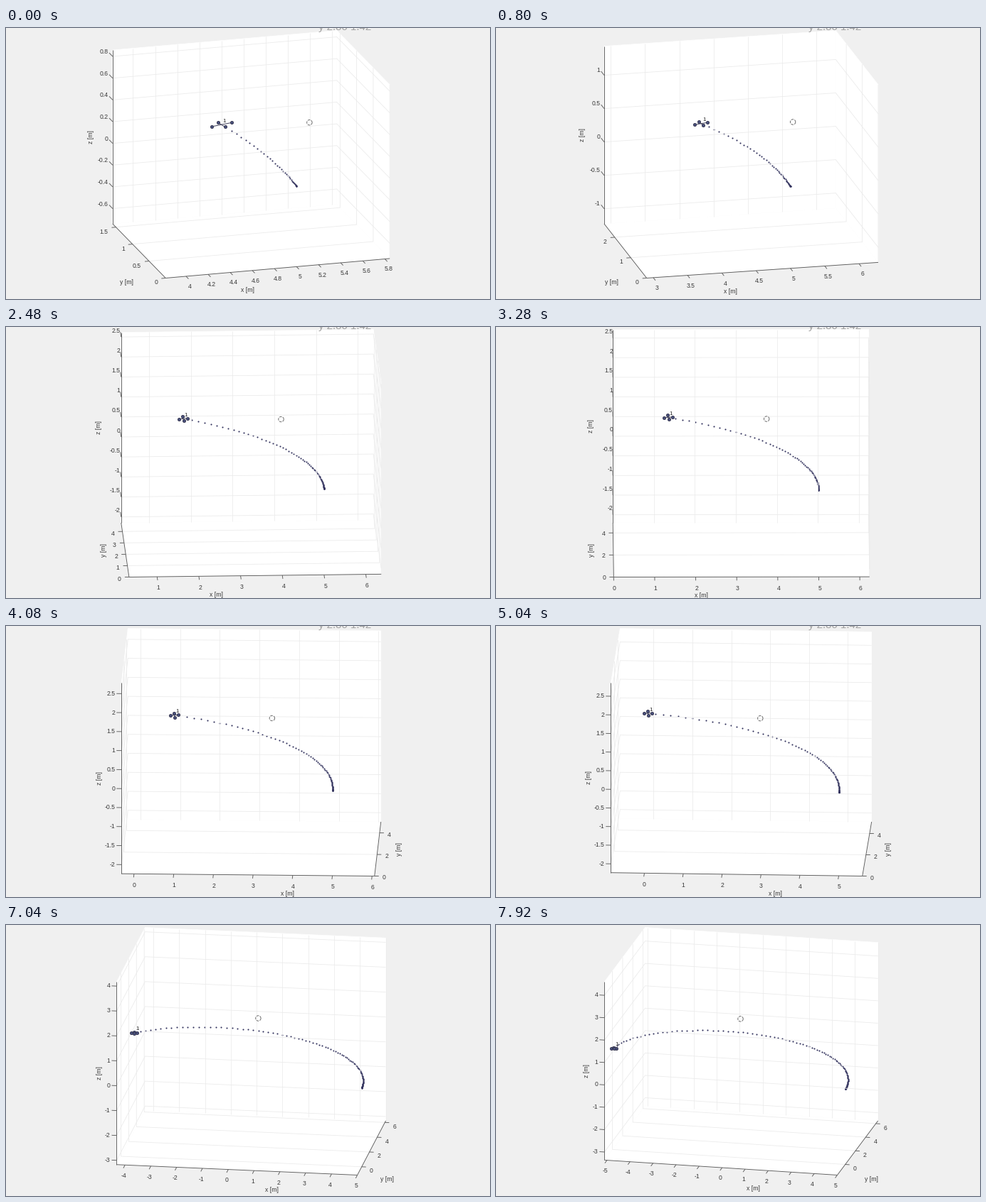
Animation of 680x382 px, one loop 8 s. Source, as a matplotlib script:

```python
import numpy as np
import matplotlib.pyplot as plt
from matplotlib.animation import FuncAnimation
from matplotlib.collections import LineCollection

W, H, FRAMES, INTERVAL = 680, 382, 100, 80
PX = 0.72  # points per pixel at 100 dpi
INK, GRID, NAVY, PAPER = "#3a3a3a", "#ebebeb", "#34345f", "#f0f0f0"

# The camera pan and the flight slow down in the middle of the loop.
KEY_FRAMES = [0, 19, 31, 51, 63, 77, 99]
AZIMUTH = [-13.3, -7.8, -1.8, 1.45, 2.1, 3.55, 9.9]
STEP = [34.9, 56.7, 69.3, 74.8, 80, 89.9, 113]

CENTRE = np.array([344, 177.5])       # middle of the plot box on the stage
BOX_HEIGHT, DEPTH_RISE = 349, 76.5    # whole box, and the part due to depth
TALL = 0.757                          # drawn height per unit of width
ASPECT = np.array([1, 0.788, 0.788])  # y and z ranges relative to x

plt.rcParams["font.family"] = "Liberation Sans"
fig = plt.figure(figsize=(W / 100, H / 100), dpi=100, facecolor=PAPER)
ax = fig.add_axes([0, 0, 1, 1])


def turn_at(step):
    return 0.00025 * np.asarray(step, float) ** 2


def helix(step):
    """Position after a number of steps of constant angular acceleration."""
    angle = turn_at(step)
    return np.stack([5 * np.cos(angle), 5 * np.sin(angle), 0.39 * angle], axis=-1)


def box_edges(azimuth):
    """Screen vectors of the box edges; the box always fills the same height."""
    a = np.radians(azimuth)
    size = (BOX_HEIGHT - DEPTH_RISE) / (TALL + 0.37 * abs(np.sin(a)))
    shift = size * np.sin(a)
    return np.array([[size * np.cos(a), 0.37 * shift],
                     [shift, -DEPTH_RISE],
                     [0, -TALL * size]])


def limits(points):
    """Equal-scale limits around the path, with room for the rotors."""
    lo, hi = points.min(axis=0) - (0.11, 0, 0), points.max(axis=0) + (0, 0.1, 0)
    half = max((hi - lo) / ASPECT) * ASPECT / 2
    return (lo + hi) / 2 - half, (lo + hi) / 2 + half


def ticks(lo, hi, steps, bounds):
    step = steps[int(np.searchsorted(bounds, hi - lo))]
    first, last = np.ceil(lo / step - 1e-3), np.floor(hi / step + 1e-3)
    return np.arange(first, last + 1) * step


def unit(v):
    return v / np.hypot(*v)


def number(value):
    return f"{round(value, 2) + 0:g}"


def label(pos, text, **kw):
    style = dict(ha="center", va="center_baseline", color=INK, fontsize=8.6 * PX)
    ax.text(pos[0], pos[1], text, **{**style, **kw})


def lines(segments, color, width):
    ax.add_collection(LineCollection(segments, colors=color, linewidths=width * PX))


def draw_box(edges, lo, hi, project):
    u, v, w = edges
    (x0, y0, z0), (x1, y1, z1) = lo, hi
    left = v[0] < 0
    lean = abs(v[0])
    axis_x, wall_x = (x0, x1) if left else (x1, x0)
    z_y = y1 if left else y0
    corner = project(x0, y0, z0)

    xs = ticks(x0, x1, (.2, .5, 1), (2.5, 5.2))
    ys = ticks(y0, y1, (.5, 1, 2), (2.5, 4.9))
    zs = ticks(z0, z1, (.2, .5, 1), (2.4, 6.2))

    # floor, back wall and side wall
    for start, p, q in ((corner, u, v), (corner + v, u, w),
                        (project(wall_x, y0, z0), v, w)):
        ax.fill(*np.array([start, start + p, start + p + q, start + q]).T,
                color="white", lw=0.5)
    grid = [[project(x, y1, z0), project(x, y1, z1)] for x in xs]
    grid += [[project(axis_x, y, z0), project(wall_x, y, z0), project(wall_x, y, z1)]
             for y in ys]
    grid += [[project(axis_x, y1, z), project(wall_x, y1, z), project(wall_x, y0, z)]
             for z in zs]
    lines(grid, GRID, 0.8)

    # axes, tick marks and numbers
    x_dir, y_dir = -unit(v), unit(-u if left else u)
    z_dir = unit(v if left else -u)
    marks = [[corner, corner + u],
             [project(axis_x, y0, z0), project(axis_x, y1, z0)],
             [project(x0, z_y, z0), project(x0, z_y, z1)]]
    for x in xs:
        p = project(x, y0, z0)
        marks.append([p, p + 5 * x_dir])
        label(p + 6 * x_dir + (1, 9), number(x))
    for y in ys:
        p = project(axis_x, y, z0)
        marks.append([p, p + 6 * y_dir])
        label(p + 11 * y_dir + (0, 4.5 * min(1, lean / 30)), number(y),
              ha="right" if left else "left")
    for z in zs:
        p = project(x0, z_y, z)
        marks.append([p, p + 7 * z_dir])
        label(p + 9 * z_dir - (0, 1), number(z), ha="right")
    lines(marks, "#5a5a5a", 0.9)

    side = -1 if left else 1
    label(corner + u / 2 + (side * (57 - .2 * lean), 25 + .07 * lean), "x [m]")
    y_mid = project(axis_x, (y0 + y1) / 2, z0)
    if lean > 18:
        label(y_mid + (side * (27 - .13 * lean), 43), "y [m]")
    else:
        label(y_mid + (side * 30, 0), "y [m]", rotation=90, va="center")
    z_mid = project(x0, z_y, (z0 + z1) / 2)
    z_gap = 18 + 3.2 * max(len(number(z)) for z in zs)
    label(z_mid - (z_gap, 0), "z [m]", rotation=90, va="center")


def draw_drone(step, project):
    head = helix(step)
    bank = 0.04 * np.sin(turn_at(step)) ** 2
    arms = np.array([(0.1, 0.03, 0), (0.015, -0.06, -bank)])
    tips = [[project(*(head - arm)), project(*(head + arm))] for arm in arms]
    lines(tips, "#44445c", 1)
    ax.scatter(*np.concatenate(tips).T, s=(4.2 * PX) ** 2, color="#48507c",
               edgecolor="#33334a", lw=0.8 * PX, zorder=3, snap=False)
    label(project(*head) + (4, -6), "1", fontsize=8 * PX, color="#222222")


def draw(frame):
    ax.cla()
    ax.set(xlim=(-.5, W - .5), ylim=(H - .5, -.5))
    ax.axis("off")

    step = np.interp(frame, KEY_FRAMES, STEP)
    edges = box_edges(np.interp(frame, KEY_FRAMES, AZIMUTH))
    path = helix(np.append(np.arange(int(step)), step))
    lo, hi = limits(path)
    corner = CENTRE - edges.sum(axis=0) / 2

    def project(x, y, z):
        return corner + (np.stack([x, y, z], axis=-1) - lo) / (hi - lo) @ edges

    draw_box(edges, lo, hi, project)

    # lower edge of a heading that is cut off by the top of the stage
    if frame < 70:
        label((476, 2), "y 2.80 1.42", va="baseline", color="#a0a0a0", fontsize=15 * PX)

    ax.scatter(*project(*path[:-1].T).T, s=(2.1 * PX) ** 2, color=NAVY, lw=0, snap=False)
    draw_drone(step, project)

    # the ring drifts against the turn of the box
    shift = edges[1, 0]
    turn = np.linspace(0, 2 * np.pi, 40)
    ax.plot(379 - .63 * shift + 3.7 * np.cos(turn),
            129 + .05 * abs(shift) + 3.7 * np.sin(turn),
            color="#606060", lw=0.9 * PX, dashes=(4, 1.5))
    return []


anim = FuncAnimation(fig, draw, frames=FRAMES, init_func=lambda: [],
                     interval=INTERVAL, repeat=True, repeat_delay=0)
plt.show()
```
